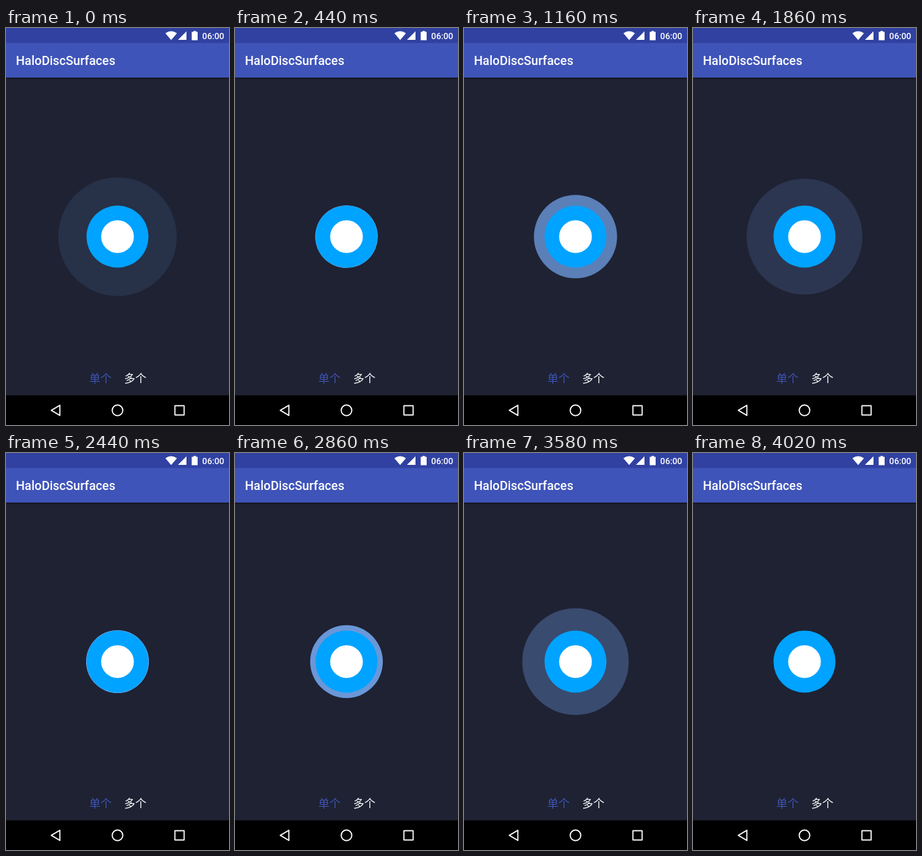
Recreate the animation shown at these times as an HTML page. Size 320x569 px, loop 4.04 s.

```html
<!DOCTYPE html>
<html lang="zh">
<head>
<meta charset="utf-8">
<title>Ripple</title>
<style>
html, body { margin: 0; height: 100%; overflow: hidden; background: #1e2233; }
svg { display: block; width: 100vw; height: 100vh; }
text { font-family: Roboto, sans-serif; font-weight: 500; fill: #fff; }
.tab { font: 400 16px "Noto Sans CJK SC", "Noto Sans CJK", sans-serif; }
</style>
</head>
<body>
<svg viewBox="0 0 320 569">
  <defs>
    <linearGradient id="shade" x2="0" y2="1">
      <stop stop-color="#000" stop-opacity=".35"/>
      <stop offset="1" stop-color="#000" stop-opacity="0"/>
    </linearGradient>
  </defs>
  <rect width="320" height="569" fill="#1e2233"/>

  <!-- status bar and title bar -->
  <rect y="71" width="320" height="4" fill="url(#shade)"/>
  <rect width="320" height="71" fill="#3f54b9"/>
  <rect width="320" height="21.5" fill="#3041a1"/>
  <g fill="#fff">
    <path d="M237 17.2 228.7 7.4Q237 1.8 245.3 7.4Z"/>
    <path d="M247 17V16.8L259 4.8V17Z"/>
    <path d="M266.5 5.6H269V4.2H272.6V5.6H275V17.6H266.5Z"/>
  </g>
  <text x="281.6" y="15.6" font-size="12.4">06:00</text>
  <text x="14.2" y="53" font-size="17.8">HaloDiscSurfaces</text>

  <!-- ripple and button -->
  <circle id="ripple" cx="160" cy="299" fill="#7aaefa"/>
  <circle cx="160" cy="299" r="44.5" fill="#00a3ff"/>
  <circle cx="160" cy="299" r="23.5" fill="#fff"/>

  <text class="tab" x="119.5" y="507.6" style="fill:#3f54b5">单个</text>
  <text class="tab" x="169.5" y="507.6">多个</text>

  <!-- navigation bar -->
  <rect y="526.5" width="320" height="43" fill="#000"/>
  <g fill="none" stroke="#fff" stroke-width="1.7" stroke-linejoin="round">
    <path d="M65 548 77.3 540.7V555.3Z"/>
    <circle cx="160" cy="548" r="7.6"/>
    <rect x="242.4" y="541.4" width="13.2" height="13.2"/>
  </g>
</svg>
<script>
const LOOP = 4040, PERIOD = 1945, START = 400, RADIUS = 44.8;
const ripple = document.getElementById("ripple");

function draw(now) {
  const t = now % LOOP;
  const p = (t - START + PERIOD) % PERIOD / PERIOD;
  const s = (1 - Math.cos(Math.PI * p)) / 2; // accelerate, then decelerate
  ripple.setAttribute("r", RADIUS * (1 + s));
  // the faint end of each ripple drops out at once
  ripple.setAttribute("opacity", s > 0.925 ? 0 : 1 - s);
  requestAnimationFrame(draw);
}
draw(performance.now());
</script>
</body>
</html>
```
